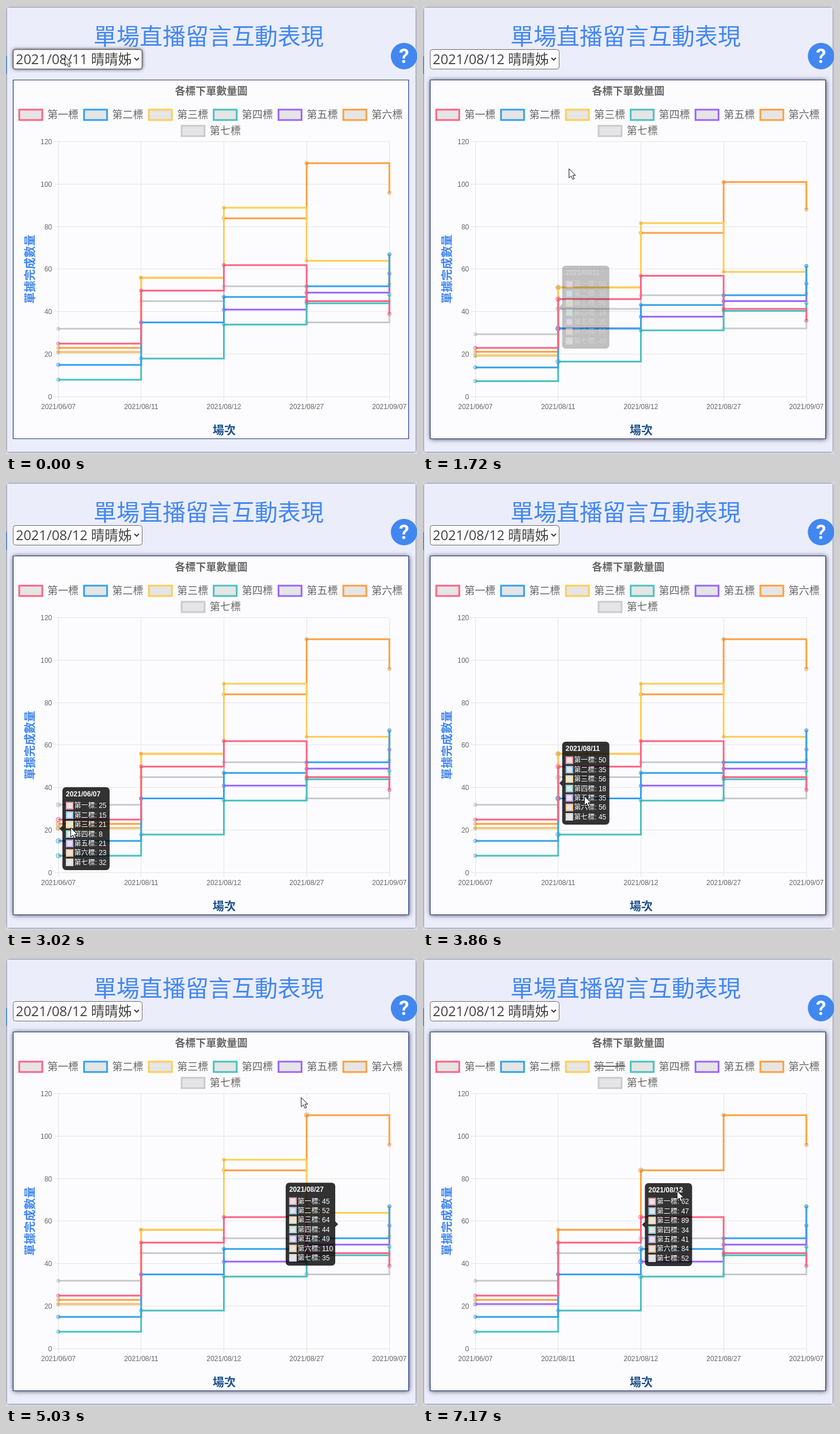
An HTML page with a canvas for the animation above (7.21 s loop, 714x778 px).

```html
<!DOCTYPE html>
<html lang="zh-Hant">
<head>
<meta charset="utf-8">
<style>
html, body { margin: 0; width: 100%; height: 100%; overflow: hidden; background: #ebedfb; }
canvas { display: block; }
</style>
</head>
<body>
<canvas id="stage" width="714" height="778"></canvas>
<script>
const ctx = document.getElementById('stage').getContext('2d');
const LOOP = 7210, GROW = 1255, PICK = 1190, HIDE = 5900;
const CJK = '"Noto Sans CJK TC", "Noto Sans CJK", sans-serif';
const SANS = '"Liberation Sans", ' + CJK;
const BLUE = '#4287f0', INK = '#666', FAINT = '#e5e5e5';

const dates = ['06/07', '08/11', '08/12', '08/27', '09/07'].map(day => '2021/' + day);
const series = [
  ['一', '#ff6384', [25, 50, 62, 45, 39]],
  ['二', '#36a2eb', [15, 35, 47, 52, 67]],
  ['三', '#ffcd56', [21, 56, 89, 64, 53]],
  ['四', '#4bc0c0', [8, 18, 34, 44, 48]],
  ['五', '#9966ff', [21, 35, 41, 49, 58]],
  ['六', '#ff9f40', [23, 56, 84, 110, 96]],
  ['七', '#c9cbcf', [32, 45, 52, 35, 67]],
].map(([number, color, values]) => ({ name: `第${number}標`, color, values }));

// pointer moves: start, end, and the place reached
const home = [102, 87];
const moves = [
  [130, 1200, 127, 149], [1480, 1650, 274, 228], [1650, 2100, 142, 571],
  [2100, 2400, 112, 600], [3150, 3860, 280, 545], [4000, 4550, 655, 300],
  [4885, 5030, 513, 242], [5030, 5350, 325, 188], [5900, 6080, 441, 326],
  [6080, 6400, 441, 404],
];

const clamp = v => Math.max(0, Math.min(1, v));
const ramp = (t, start, length) => clamp((t - start) / length);
const easeOut = p => 1 - (1 - p) ** 4;
const mix = (a, b, p) => a + (b - a) * p;
const xAt = i => 91 + 143.75 * i;
const yAt = v => 678.5 - v * 3.6875;

const pointerAt = t => moves.reduce(([x, y], [start, end, toX, toY]) => {
  const p = ramp(t, start, end - start);
  return [mix(x, toX, p), mix(y, toY, p)];
}, home);

// chart column under the pointer, -1 outside the plot
function columnAt(t) {
  const [x, y] = pointerAt(t);
  const inside = x >= xAt(0) && x <= xAt(4) && y >= yAt(120) && y <= yAt(0);
  return inside ? Math.round((x - xAt(0)) / 143.75) : -1;
}

const hovers = [];
for (let t = 0, last = -1; t < LOOP; t++) {
  const column = columnAt(t);
  if (column !== last) hovers.push([t, last = column]);
}

function text(str, x, y, font, color, align = 'left') {
  ctx.font = font;
  ctx.fillStyle = color;
  ctx.textAlign = align;
  ctx.fillText(str, x, y);
}

function line(color, width, ...points) {
  ctx.strokeStyle = color;
  ctx.lineWidth = width;
  ctx.beginPath();
  points.forEach(([x, y]) => ctx.lineTo(x, y));
  ctx.stroke();
}

function box(x, y, w, h, r, fill, border, width = 1) {
  ctx.beginPath();
  ctx.roundRect(x, y, w, h, r);
  ctx.fillStyle = fill;
  ctx.fill();
  ctx.shadowColor = 'transparent';
  if (!border) return;
  ctx.strokeStyle = border;
  ctx.lineWidth = width;
  ctx.stroke();
}

function glow(amount, blur) {
  ctx.shadowColor = `rgba(50,50,70,${amount})`;
  ctx.shadowBlur = blur;
}

function drawPage(t) {
  ctx.fillStyle = '#e4e6f2';
  ctx.fillRect(0, 0, 714, 778);
  glow(0.8, 5);
  box(2, 3, 709.5, 771, 2, '#ebedfb');
  ctx.fillStyle = BLUE;
  ctx.fillRect(0, 87, 1.5, 31);

  text('單場直播留言互動表現', 352, 67, '500 40px ' + CJK, BLUE, 'center');

  const focus = 1 - ramp(t, 1000, 200);
  glow(focus, 6);
  box(12.5, 75.5, 224, 34, 4, '#fdfdff', '#6a6a6a', 1 + 0.6 * focus);
  text(`${dates[t < PICK ? 1 : 2]} 晴晴姊`, 17, 101, '23.5px "Open Sans", ' + CJK, '#444');
  line('#333', 1.8, [223, 90], [227, 94], [231, 90]);

  box(668.5, 64, 46, 46, 23, BLUE);
  text('?', 691.5, 99, 'bold 35px Roboto, sans-serif', '#fff', 'center');

  glow(ramp(t, 1100, 200), 8);
  box(12.5, 128.5, 687, 623, 0, '#fcfcfe', '#1f3b78', 1.2);
}

function drawFrame(t) {
  text('各標下單數量圖', 356.5, 154, 'bold 18px ' + CJK, INK, 'center');
  series.forEach(({ name, color }, i) => {
    const x = i < 6 ? 22 + i * 112.6 : 304, y = i < 6 ? 179 : 207;
    box(x + 1, y + 1, 40, 18, 0, FAINT, color, 3);
    text(name, x + 50, y + 16, '18px ' + CJK, INK);
    if (i === 2 && t >= HIDE) line(INK, 2, [x + 50, 188], [x + 104, 188]);
  });

  for (let v = 0; v <= 120; v += 20) {
    const y = Math.round(yAt(v)) - 0.5;
    line(FAINT, 1, [83, y], [666, y]);
    text(v, 80, y + 4.5, '12px ' + SANS, INK, 'right');
  }
  dates.forEach((date, i) => {
    const x = Math.floor(xAt(i)) + 0.5;
    line(FAINT, 1, [x, 236], [x, 686]);
    text(date, xAt(i), 700, '12px ' + SANS, INK, 'center');
  });

  text('場次', 379, 744, 'bold 20px ' + CJK, '#1f528c', 'center');
  ctx.save();
  ctx.translate(49, 457);
  ctx.rotate(-Math.PI / 2);
  text('單據完成數量', 0, 0, 'bold 20px ' + CJK, BLUE, 'center');
  ctx.restore();
}

function drawSeries(t, active) {
  const grow = t < GROW ? 1 : easeOut(ramp(t, GROW, 1000));
  for (let s = 6; s >= 0; s--) {
    const { color, values } = series[s];
    const points = values.map((v, i) => [xAt(i), yAt(v * grow)]);
    ctx.globalAlpha = s === 2 ? 1 - easeOut(ramp(t, HIDE, 1000)) : 1;
    line(color, 3, ...points.flatMap(([x, y], i) => i ? [[x, points[i - 1][1]], [x, y]] : [[x, y]]));
    points.forEach(([x, y], i) => {
      const r = i === active ? 4 : 3;
      box(x - r, y - r, 2 * r, 2 * r, r, 'rgba(0,0,0,.1)', color);
    });
  }
  ctx.globalAlpha = 1;
}

// resting place of the tooltip for a column: left, caret height, width
function place(i) {
  const mean = series.reduce((sum, s) => sum + s.values[i], 0) / series.length;
  const w = i === 3 ? 88.7 : 82;
  return [i < 3 ? xAt(i) + 7 : xAt(i) - 7 - w, yAt(mean), w];
}

function tooltipAt(t) {
  let from, to, start = 0, column = -1, shown = -1, fadeStart = 0;
  const rectAt = time => from.map((v, k) => mix(v, to[k], easeOut(ramp(time, start, 400))));
  for (const [time, i] of hovers) {
    if (time > t) break;
    if ((i < 0) !== (column < 0)) fadeStart = time;
    column = i;
    if (i < 0) continue;
    from = to ? rectAt(time) : place(i);
    to = place(i);
    start = time;
    shown = i;
  }
  if (!to) return { column, alpha: 0 };
  const fade = ramp(t, fadeStart, 200);
  return { column, shown, alpha: column < 0 ? 1 - fade : fade, rect: rectAt(t) };
}

function drawTooltip({ alpha, shown, rect }) {
  if (!alpha) return;
  const [x, mid, w] = rect, y = mid - 72;
  const edge = shown < 3 ? x : x + w, d = shown < 3 ? 5 : -5;
  ctx.globalAlpha = alpha;
  ctx.fillStyle = 'rgba(0,0,0,.8)';
  ctx.beginPath();
  ctx.roundRect(x, y, w, 144, 6);
  ctx.moveTo(edge, mid + d);
  ctx.lineTo(edge - d, mid);
  ctx.lineTo(edge, mid - d);
  ctx.fill();
  text(dates[shown], x + 6, y + 16, 'bold 12px ' + SANS, '#fff');
  series.forEach(({ name, color, values }, i) => {
    const row = y + 32 + i * 16.4;
    box(x + 6, row - 6.5, 13, 13, 0, '#fff');
    box(x + 7, row - 5.5, 11, 11, 0, FAINT, color);
    text(`${name}: ${values[shown]}`, x + 20.5, row + 4.3, '12px ' + SANS, '#fff');
  });
  ctx.globalAlpha = 1;
}

const arrow = new Path2D('M0 0V16L3.7 12.5L6.4 18.5L9 17.4L6.4 11.5H11.3Z');
function drawPointer(t) {
  const [x, y] = pointerAt(t);
  ctx.save();
  ctx.translate(x + 0.5, y + 0.5);
  ctx.fillStyle = '#fff';
  ctx.fill(arrow);
  ctx.strokeStyle = '#111';
  ctx.lineWidth = 1;
  ctx.stroke(arrow);
  ctx.restore();
}

const origin = performance.now();
function render() {
  const t = (performance.now() - origin) % LOOP;
  const tooltip = tooltipAt(t);
  drawPage(t);
  drawFrame(t);
  drawSeries(t, tooltip.column);
  drawTooltip(tooltip);
  drawPointer(t);
  requestAnimationFrame(render);
}
render();
</script>
</body>
</html>
```
